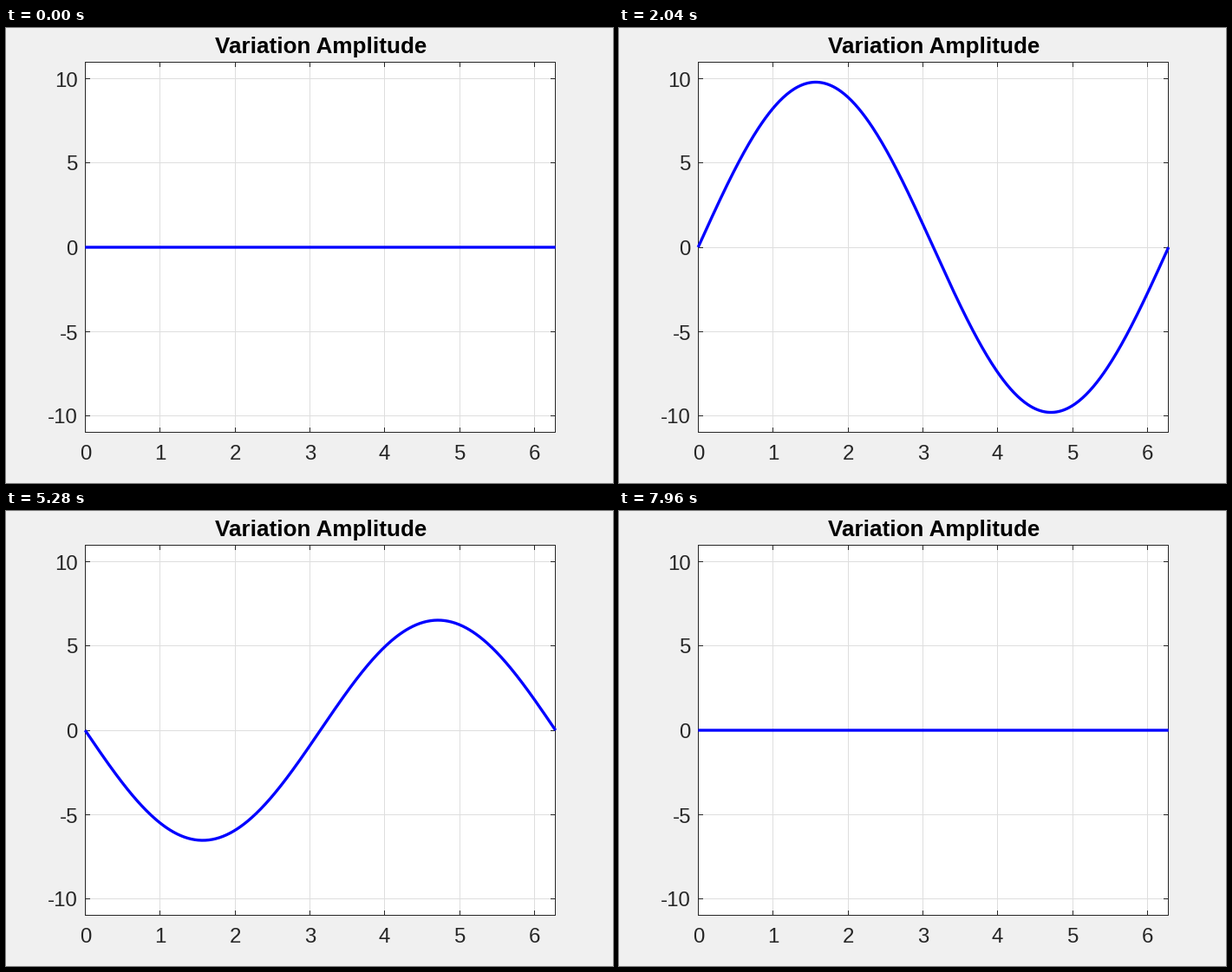
These frames come from a looping animation (700 by 525 pixels, 8 s). A matplotlib script:

```python
import numpy as np
import matplotlib.pyplot as plt
from matplotlib.animation import FuncAnimation
from matplotlib.patches import Rectangle

W, H, DPI = 700, 525, 100
PT = 72 / DPI                       # points per pixel
STEPS = 50                          # frames per quarter of the loop
INK, GRID, BACK = "#262626", "#dedede", "#f0f0f0"
LEFT, RIGHT, TOP, BOTTOM = 91.5, 633.5, 39.5, 466.5
MID_X, MID_Y = (LEFT + RIGHT) / 2, (TOP + BOTTOM) / 2
SX, SY = 542.5 / (2 * np.pi), 427.875 / 22
TICK = 5

plt.rcParams["font.family"] = "Liberation Sans"
fig = plt.figure(figsize=(W / DPI, H / DPI), dpi=DPI, facecolor=BACK)
ax = fig.add_axes([0, 0, 1, 1])
ax.set(xlim=(0, W), ylim=(H, 0))
ax.axis("off")


def stroke(xs, ys, color, z):
    ax.plot(xs, ys, color=color, lw=PT, zorder=z, snap=False,
            solid_capstyle="projecting")


def label(x, y, text, ha="center", size=24, **kw):
    ax.text(x, y, text, ha=ha, va="baseline", fontsize=size * PT, **kw)


ax.add_patch(Rectangle((LEFT, TOP), RIGHT - LEFT, BOTTOM - TOP,
                       fc="white", ec="none", zorder=0))

for v in range(7):
    x = np.floor(LEFT + v * SX) + 0.5
    if v:
        stroke([x, x], [TOP, BOTTOM], GRID, 1)
    stroke([x, x], [TOP, TOP + TICK], INK, 2)
    stroke([x, x], [BOTTOM, BOTTOM - TICK], INK, 2)
    label(x, 497.6, str(v), color=INK)

for v in range(-10, 11, 5):
    y = np.floor(MID_Y - v * SY) + 0.5
    stroke([LEFT, RIGHT], [y, y], GRID, 1)
    stroke([LEFT, LEFT + TICK], [y, y], INK, 2)
    stroke([RIGHT, RIGHT - TICK], [y, y], INK, 2)
    label(83, y + 9, str(v), ha="right", color=INK)

stroke([LEFT, RIGHT, RIGHT, LEFT, LEFT], [TOP, TOP, BOTTOM, BOTTOM, TOP], INK, 2)
label(363, 29, "Variation Amplitude", size=26, weight="bold", color="black")

t = np.linspace(0, 2 * np.pi, 400)
xs = MID_X + (t - np.pi) * SX
curve, = ax.plot(xs, np.full_like(xs, MID_Y), color="#0000ff", lw=3.33 * PT,
                 zorder=3, snap=False, solid_capstyle="butt")


def amplitude(i):
    """Triangle wave 0, 10, 0, -10, 0 that holds one frame at each turn."""
    quarter, k = divmod(i, STEPS)
    ramp = k / (STEPS - 1)
    return 10 * (ramp, 1 - ramp, -ramp, ramp - 1)[quarter]


def update(i):
    curve.set_ydata(MID_Y - SY * amplitude(i) * np.sin(t))
    return curve,


anim = FuncAnimation(fig, update, frames=4 * STEPS, interval=40,
                     repeat=True, repeat_delay=0)
plt.show()
```
